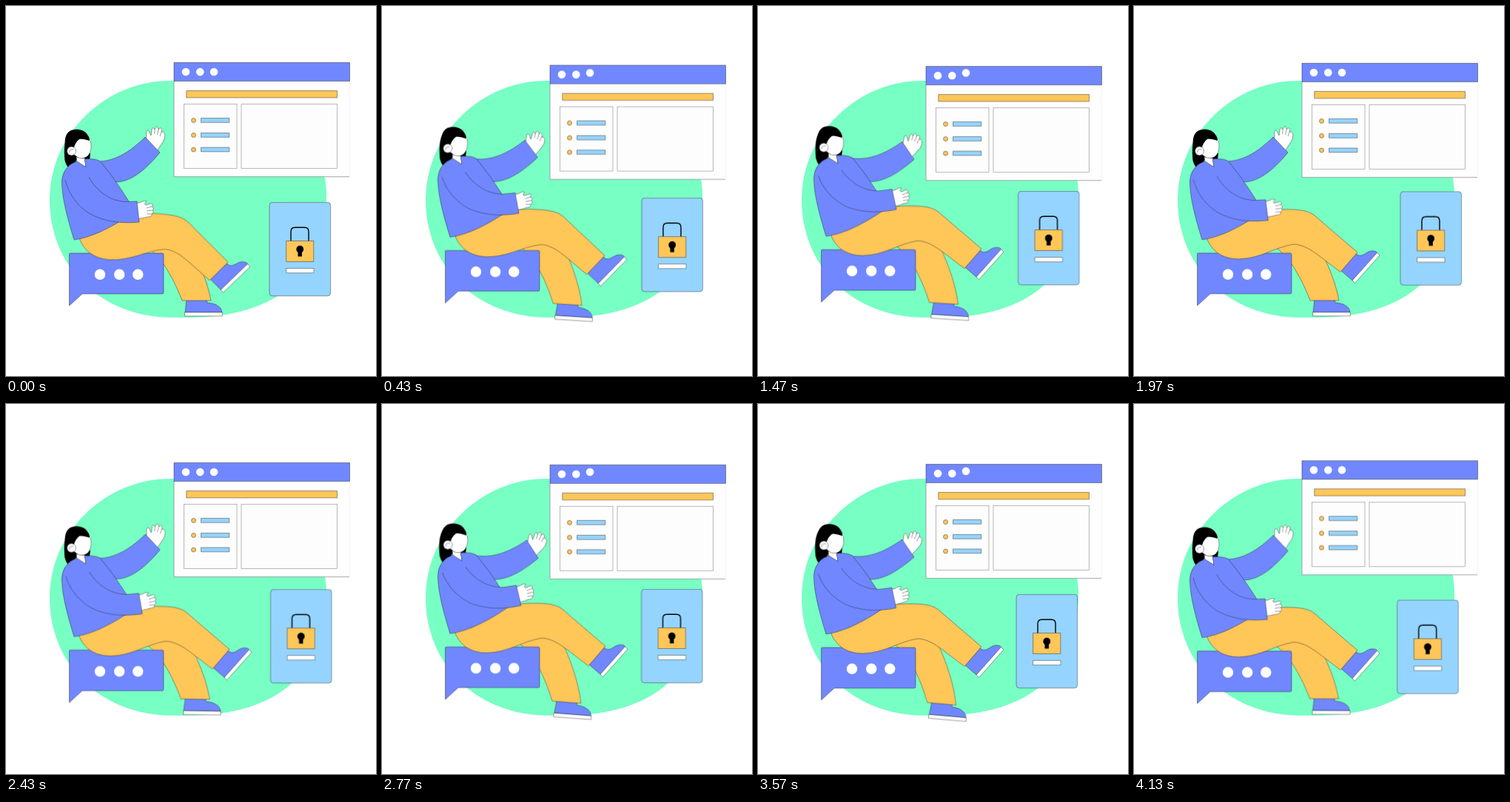
These frames come from a looping animation (500x500 px, 4160 ms). An HTML page without scripts:

```html
<!DOCTYPE html>
<html lang="en">
<head>
<meta charset="utf-8">
<title>Secure browsing</title>
<style>
  html, body { margin: 0; width: 100%; height: 100%; overflow: hidden; background: #fff; }
  svg { display: block; width: 100vw; height: 100vh; }

  .blue { fill: #7087ff; }
  .gold { fill: #ffc658; }
  .sky { fill: #95d4ff; }
  .white { fill: #fff; }
  .ink { fill: #000; }
  .line { stroke: #222; stroke-width: .6; stroke-opacity: .75; stroke-linejoin: round; }
  .none { fill: none; }

  /* every part swings forth and back over one half loop */
  .move { animation: 2080ms linear infinite alternate; }
  .window { animation-name: window; }
  .hop2 { animation-name: hop2; }
  .hop3 { animation-name: hop3; }
  .card { animation-name: card; }
  .body { animation-name: body; }
  .far-arm { animation-name: far-arm; transform-origin: 132px 223px; }
  .near-arm { animation-name: near-arm; transform-origin: 72px 221px; }
  .far-leg { animation-name: far-leg; transform-origin: 114px 297px; }
  .head { animation-name: head; transform-origin: 98px 206px; }
  .hair { animation-name: hair; }
  .near-leg { animation: near-leg 4160ms linear infinite; transform-origin: 130px 315px; }

  @keyframes window {
    50% { transform: translateY(8.7px); }
    0%, 100% { transform: none; }
  }
  @keyframes hop2 {
    0%, 33%, 62%, 100% { transform: none; }
    45% { transform: translateY(-5px); }
  }
  @keyframes hop3 {
    0%, 14%, 38%, 58%, 82%, 100% { transform: none; }
    26%, 70% { transform: translateY(-4px); }
  }
  @keyframes card {
    0% { transform: translate(0, 0); }
    28.4% { transform: translate(-7px, -8px); }
    41.8% { transform: translate(-9.5px, -11.3px); }
    52.4% { transform: translate(-9.3px, -15px); }
    70.7% { transform: translate(-4.5px, -15px); }
    83.2% { transform: translate(1.5px, -14.7px); }
    100% { transform: translate(5px, -14.5px); }
  }
  @keyframes body {
    0%, 100% { transform: translateY(0); }
    28.4% { transform: translateY(-5px); }
    41.8% { transform: translateY(-7.7px); }
    51% { transform: translateY(-9.3px); }
    70.7% { transform: translateY(-4.8px); }
    83.2% { transform: translateY(-1.5px); }
    91% { transform: translateY(-.3px); }
  }
  @keyframes far-arm {
    0%, 100% { transform: translateY(0) rotate(0deg); }
    28.4% { transform: translateY(1.3px) rotate(9.3deg); }
    41.8% { transform: translateY(2px) rotate(14deg); }
    52.4% { transform: translateY(2.2px) rotate(15deg); }
    70.7% { transform: translateY(1.3px) rotate(9.5deg); }
    83.2% { transform: translateY(0) rotate(.4deg); }
  }
  @keyframes near-arm {
    0%, 100% { transform: rotate(0deg); }
    51% { transform: rotate(-10.5deg); }
  }
  @keyframes far-leg {
    0%, 87.5%, 100% { transform: rotate(0deg); }
    46.6% { transform: rotate(8.2deg); }
    52.4% { transform: rotate(7.4deg); }
  }
  @keyframes near-leg {
    0% { transform: rotate(4.4deg); }
    26%, 100% { transform: rotate(0deg); }
  }
  @keyframes head {
    0%, 85%, 100% { transform: translateY(0) rotate(0deg); }
    51% { transform: translateY(1px) rotate(5deg); }
  }
  @keyframes hair {
    0%, 85%, 100% { transform: translate(0, 0); }
    51% { transform: translate(-3px, 4px); }
  }
</style>
</head>
<body>
<svg viewBox="0 0 500 500" xmlns="http://www.w3.org/2000/svg">
  <path fill="#78ffc4" d="M59 262C59 173 134 101 222 101C340 101 433 168 433 255C433 361 370 421 245 421H225C128 421 59 352 59 262Z"/>

  <g class="move window">
    <rect x="227" y="76.5" width="237" height="154" fill="#fefefe" stroke="#e4e4e4" stroke-width=".5"/>
    <path class="none" stroke="#777" stroke-width=".6" d="M227 101V230.7H464"/>
    <rect class="blue line" x="227" y="76.5" width="237.5" height="25"/>
    <circle class="white" cx="243" cy="89" r="5.3"/>
    <circle class="white move hop2" cx="262.3" cy="89" r="5.3"/>
    <circle class="white move hop3" cx="281" cy="89" r="5.3"/>
    <rect class="gold line" x="243.8" y="114.5" width="203.7" height="9.4"/>
    <g fill="#fdfdfd" stroke="#888" stroke-width=".6">
      <rect x="240.5" y="132.7" width="71.5" height="86.8"/>
      <rect x="318" y="132.7" width="129.5" height="86.8"/>
    </g>
    <g class="line">
      <circle class="gold" cx="253.5" cy="154.5" r="3"/>
      <circle class="gold" cx="253.5" cy="174.5" r="3"/>
      <circle class="gold" cx="253.5" cy="194" r="3"/>
      <rect class="sky" x="263.5" y="151.5" width="38.3" height="5.8"/>
      <rect class="sky" x="263.5" y="171.5" width="38.3" height="5.8"/>
      <rect class="sky" x="263.5" y="191" width="38.3" height="5.8"/>
    </g>
  </g>

  <g class="move card">
    <rect class="sky line" x="356" y="265.3" width="82.6" height="126.5" rx="4"/>
    <path class="none" stroke="#000" stroke-width="1.4" d="M385 317.5V305Q385 299.3 390.5 299.3H403.5Q409 299.3 409 305V317.5"/>
    <rect class="gold line" x="378.6" y="317.5" width="37.2" height="28"/>
    <circle class="ink" cx="397.2" cy="328.7" r="4.9"/>
    <rect class="ink" x="394.5" y="330" width="5.4" height="8.5"/>
    <rect class="white line" x="378.6" y="354.5" width="37.4" height="6.2"/>
  </g>

  <g class="move body">
    <g class="move far-leg line">
      <path class="blue" d="M244 396L242 414H292C291 406 284 402 272 401L271 396Z"/>
      <rect class="white" x="241.5" y="414" width="50.8" height="5"/>
      <path class="gold" d="M180 300V320C205 330 224 362 238 398H277C272 372 261 344 240 308V300Z"/>
    </g>

    <path class="blue line" d="M87 334H211Q213 334 213 336V387Q213 389 211 389H103L85.5 405V336Q85 334 87 334Z"/>
    <circle class="white" cx="127" cy="362.8" r="7.2"/>
    <circle class="white" cx="153.2" cy="362.8" r="7.2"/>
    <circle class="white" cx="178.3" cy="362.8" r="7.2"/>

    <g class="near-leg line">
      <path class="blue" d="M300 335C309 342 313 331 322 331C326 331 328 332 329 334L295 371L280 358Z"/>
      <path class="white" d="M328.5 333.5L332 337L298.5 374.5L295 371Z"/>
      <path class="gold" d="M98 313C104 330 118 342 142 342C172 341 190 326 216 322C236 323 252 340 279 359.5L302 333C280 314 262 299 245 284C234 274 214 275 198 275C170 276 130 290 98 313Z"/>
    </g>

    <g class="move far-arm line">
      <path class="white" d="M189 181C191 176 188 170 191 168C194 168 194 173 196 175L197 168C197 164 200 164 201 167L202 164.5C203 162 206 163 206 167L207.5 165C210 164 211 167 210 170L212 170C216 171 215 177 213 182L204 196Z"/>
      <path class="none" d="M201 167L200.5 173M206 167L204.5 174M210 170L208 176"/>
      <path class="blue" d="M118 210C145 212 168 197 188 177L208 198C193 216 172 238 148 238Z"/>
    </g>

    <path class="ink move hair" d="M90 169C78 173 78 195 79.5 209Q82 217 84.5 218.5C91 216 95 210 98 203L95 178Z"/>
    <path class="ink" d="M96 203L114 199L113 208L100 212Z"/>
    <path class="white line" d="M95 204L96 212L108 218L107 206Z"/>

    <path class="blue line" d="M92 316C84 290 76 262 75.5 240C75 223 85 213 96 210L108 217.5L106 207C115 206 122 207 127 209.5C138 223 150 238 166 264L175 277C146 298 116 313 92 316Z"/>

    <g class="move head">
      <path class="white" d="M88 184C94 176 110 176 114 182C116 190 115 197 111 202C106 207 98 207 94 202L86 198Z"/>
      <path class="line none" d="M114 182C116 190 115 197 111 202C106 207 98 207 94 202"/>
      <path class="ink" d="M80 190C78.5 178 82 171 87 168.5C95 165 106 167 110 174C112 176 113 179 113 182C108 181 103 179 99 180C95 183 93 187 92 191L83 204Z"/>
      <circle class="white line" cx="88.5" cy="196" r="6"/>
      <path class="line none" d="M86 198C85 195 88 193 91 194"/>
    </g>

    <g class="move near-arm line">
      <path class="white" d="M176 266C183 267 184 262 190 264C187 267 187 268 189 269L196 267C199 267 199 270 197 271C200 272 200 275 198 276C200 278 199 280 197 281C198 284 195 285 191 285C186 287 183 286 178 288Z"/>
      <path class="none" d="M197 271L190 273M198 276L190 277M197 281L190 281"/>
      <path class="blue" d="M112 231C122 250 140 263 160 264.5L177 264L180 292C150 295 128 289 112 280C94 268 84 252 80 235"/>
    </g>
  </g>
</svg>
</body>
</html>
```
